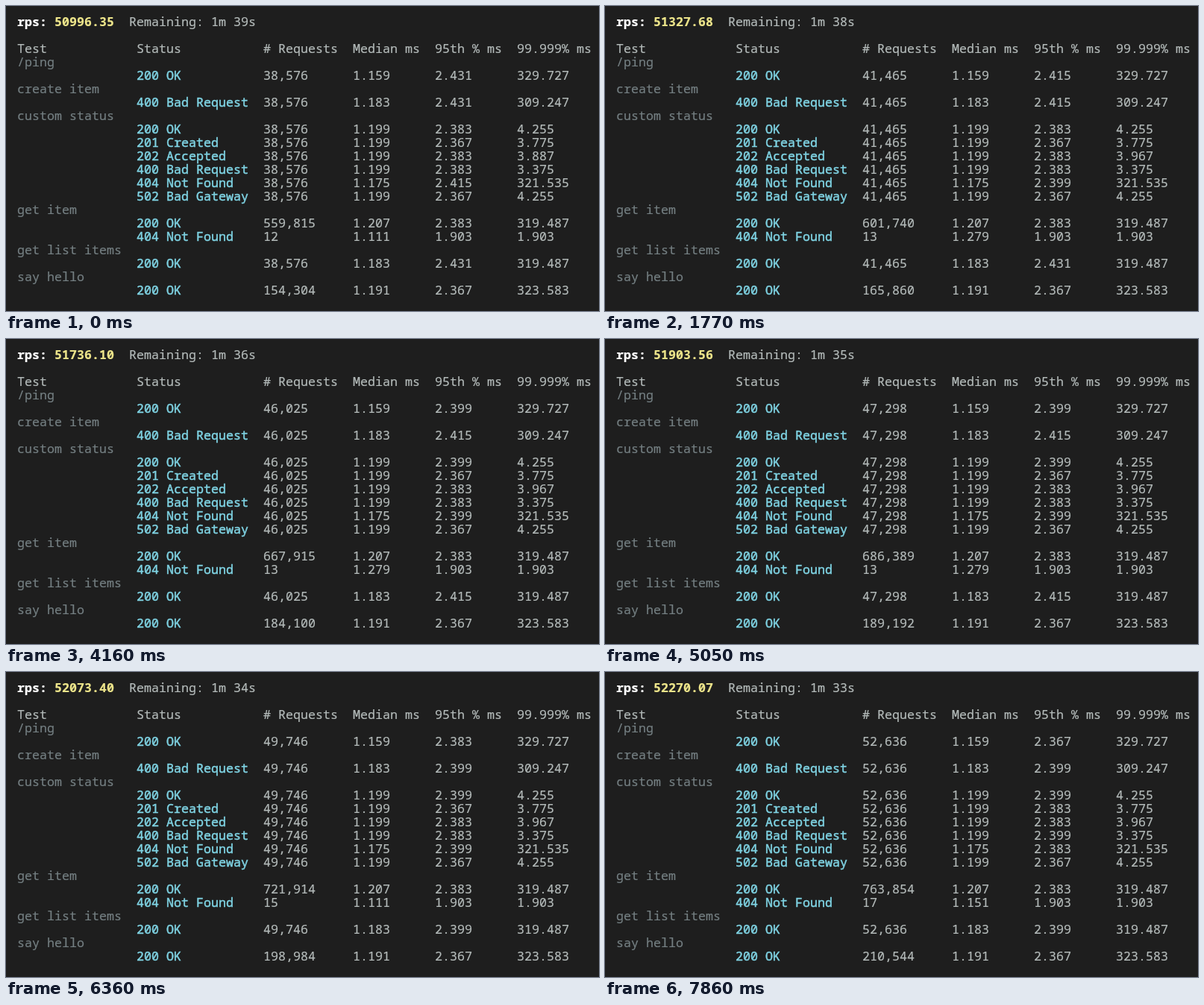
Write an HTML page that moves like this. It is 795 px wide and 409 px high and loops after 8000 ms.

```html
<!DOCTYPE html>
<html lang="en">
<head>
<meta charset="utf-8">
<title>Load test</title>
<style>
html, body { margin: 0; width: 100%; height: 100%; overflow: hidden; background: #1e1e1e; }
span {
  position: absolute;
  white-space: pre;
  font: 16.667px/19px "Noto Sans Mono", "DejaVu Sans Mono", monospace;
  font-variant-ligatures: none;
  color: #b4bbba;
  -webkit-text-stroke: 0.2px;
}
.label { color: #fff; font-weight: 700; }
.rate { color: #ece48a; font-weight: 700; }
.test { color: #747f82; }
.status { color: #7fd3e3; -webkit-text-stroke-width: 0.5px; }
</style>
</head>
<body>
<script>
const LOOP = 8000, TICK = 233, LAST_TICK = 34;

// Key points: tick, requests per endpoint, requests per second
const KEYS = [
  [0, 38576, 50996.35], [7, 41465, 51327.68], [12, 43556, 51560.31], [18, 46025, 51736.10],
  [21, 47298, 51903.56], [27, 49746, 52073.40], [34, 52636, 52270.07],
];

// 95th percentile moves in buckets of 0.016 ms, drifting from one level to another
const drift = (from, to = from) => p => (2.367 + 0.016 * Math.round(from + (to - from) * p)).toFixed(3);

const base = s => s.requests;
const hello = s => s.requests * 4;
const items = s => Math.round(s.requests * 14.512);
const missing = s => Math.round(12.49 + 4.1 * s.progress ** 3);
const missingMedian = s => missing(s) === 13 ? '1.279' : missing(s) > 15 ? '1.151' : '1.111';
const acceptedTop = s => s.progress < 0.1 ? '3.887' : '3.967';

// Line, status, counter, median, 95th percentile, top percentile
const ROWS = [
  [4, '200 OK', base, '1.159', drift(4, 0), '329.727'],
  [6, '400 Bad Request', base, '1.183', drift(3.5, 1.9), '309.247'],
  [8, '200 OK', base, '1.199', drift(0.5, 2.4), '4.255'],
  [9, '201 Created', base, '1.199', drift(0, 0.6), '3.775'],
  [10, '202 Accepted', base, '1.199', drift(1), acceptedTop],
  [11, '400 Bad Request', base, '1.199', drift(0.6, 1.6), '3.375'],
  [12, '404 Not Found', base, '1.175', drift(2.6, 1.4), '321.535'],
  [13, '502 Bad Gateway', base, '1.199', drift(0), '4.255'],
  [15, '200 OK', items, '1.207', drift(1), '319.487'],
  [16, '404 Not Found', missing, missingMedian, drift(-29), '1.903'],
  [18, '200 OK', base, '1.183', drift(4.49, 1.7), '319.487'],
  [20, '200 OK', hello, '1.191', drift(0), '323.583'],
];

const live = [];

// Text may be a function of the current state
function put(line, column, text, kind = '') {
  const el = document.createElement('span');
  el.className = kind;
  el.style.left = 15 + column * 10 + 'px';
  el.style.top = 11 + line * 18 + 'px';
  if (typeof text === 'function') live.push([el, text]);
  else el.textContent = text;
  document.body.append(el);
}

put(0, 0, 'rps:', 'label');
put(0, 5, s => s.rate.toFixed(2), 'rate');
put(0, 15, s => `Remaining: 1m ${s.seconds}s`);

[[0, 'Test'], [16, 'Status'], [33, '# Requests'], [45, 'Median ms'], [56, '95th % ms'], [67, '99.999% ms']]
  .forEach(([column, text]) => put(2, column, text));
[[3, '/ping'], [5, 'create item'], [7, 'custom status'], [14, 'get item'], [17, 'get list items'], [19, 'say hello']]
  .forEach(([line, text]) => put(line, 0, text, 'test'));

for (const [line, status, count, median, p95, top] of ROWS) {
  put(line, 16, status, 'status');
  put(line, 33, s => count(s).toLocaleString('en-US'));
  put(line, 45, median);
  put(line, 56, s => p95(s.progress));
  put(line, 67, top);
}

function stateAt(tick) {
  const next = Math.max(1, KEYS.findIndex(([t]) => t >= tick));
  const a = KEYS[next - 1], b = KEYS[next];
  const part = (tick - a[0]) / (b[0] - a[0]);
  const blend = column => a[column] + (b[column] - a[column]) * part;
  return {
    progress: tick / LAST_TICK,
    requests: Math.round(blend(1)),
    rate: blend(2),
    seconds: 39 - Math.max(0, Math.floor((tick - 1.6) / 4.7)),
  };
}

let shown = -1;
function frame() {
  const tick = Math.min(LAST_TICK, Math.floor((performance.now() % LOOP + 72) / TICK));
  if (tick !== shown) {
    shown = tick;
    const state = stateAt(tick);
    for (const [el, text] of live) el.textContent = text(state);
  }
  requestAnimationFrame(frame);
}
frame();
</script>
</body>
</html>
```
